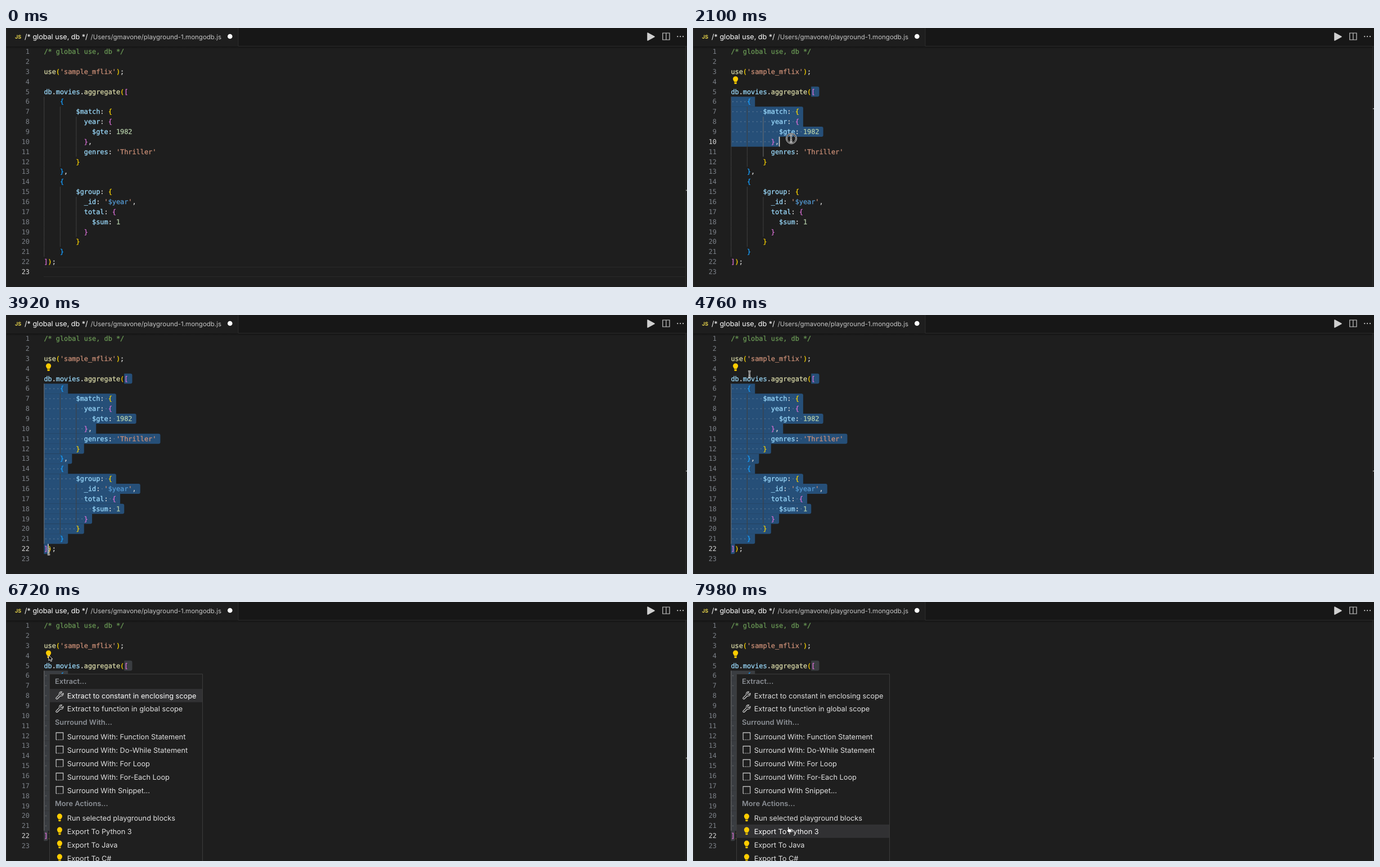
Recreate the animation shown at these times as an HTML page. Size 1211 px wide and 462 px high, loop 8000 ms.

```html
<!DOCTYPE html>
<html lang="en">
<head>
<meta charset="utf-8">
<title>Playground editor</title>
<style>
  html, body { margin: 0; width: 100%; height: 100%; overflow: hidden; background: #1e1e1e; }
  svg { display: block; width: 100%; height: 100%; }
  text { white-space: pre; text-rendering: geometricPrecision; }
  .code { font: 11.86px "DejaVu Sans Mono", monospace; }
  .code tspan { fill: currentColor; stroke: currentColor; stroke-width: .25; }
  .ui { font: 12.6px Inter, sans-serif; }
  .item { font-size: 12.74px; }
  .head { font-weight: 600; font-size: 12.8px; fill: #8b8f95; }
</style>
</head>
<body>
<svg id="stage" viewBox="0 0 1211 462">
  <defs>
    <linearGradient id="shade" x2="0" y2="1">
      <stop stop-color="#141414"/><stop offset="1" stop-color="#141414" stop-opacity="0"/>
    </linearGradient>
    <g id="bulb">
      <path d="M-2.2 3.2C-2.4 1.6-4.6.6-4.6-2.2a4.6 4.6 0 0 1 9.2 0C4.6.6 2.4 1.6 2.2 3.2Z" fill="#fc0"/>
      <path d="M-2.1 4h4.2v1.9q0 .9-1 .9h-2.2q-1 0-1-.9Z" fill="#fc0"/>
    </g>
    <path id="wrench" d="M-6.3 4.4L-.7-1.2C-1.5-4.4 1-7 4.2-6.2L1.8-3.6 2.2-1.7 4.1-1.4 6.5-3.8C7.2-.7 4.6 2 1.4 1.1L-4.2 6.6Q-5.4 7-6.3 6.2-7 5.3-6.3 4.4Z" fill="none" stroke="#d8d8d8" stroke-width="1.1" stroke-linejoin="round"/>
    <g id="snippet" fill="none" stroke="#d8d8d8" stroke-width="1.1">
      <path d="M-6.3 6.3V-6.3H6.3V6.3"/><path d="M-6.3 6.3H6.3" stroke-dasharray="1.8 1.3"/>
    </g>
    <path id="arrow" d="M0 0V9.6L2.2 7.6 3.8 11 5.5 10.2 4 7H6.9Z" fill="#000" stroke="#fff" stroke-width=".9" stroke-linejoin="round"/>
    <g id="ibeam" fill="none">
      <path d="M-2.3-5.4Q0-5.4 0-4V4Q0 5.4-2.3 5.4M2.3-5.4Q0-5.4 0-4M0 4Q0 5.4 2.3 5.4M-1.4 2H1.4" stroke="#fff" stroke-width="2.4"/>
      <path d="M-2.3-5.4Q0-5.4 0-4V4Q0 5.4-2.3 5.4M2.3-5.4Q0-5.4 0-4M0 4Q0 5.4 2.3 5.4" stroke="#222" stroke-width=".9"/>
    </g>
    <path id="hand" d="M-1 .4Q0-.9 1 .4V3.2L5 4Q6 4.4 5.8 5.8L5 9.6H.2L-2.8 5.8Q-2.9 4.6-1 5.6Z" fill="#fff" stroke="#222" stroke-width=".8" stroke-linejoin="round"/>
    <g id="ring" fill="none">
      <circle r="11" stroke="#111" stroke-width="3.4"/>
      <circle r="12.2" stroke="#fff" stroke-width="1.2"/>
      <circle r="9.8" stroke="#ddd" stroke-width="1.2"/>
    </g>
  </defs>

  <path d="M0 0H1211V462H0Z" fill="#1e1e1e"/>
  <g id="under"></g>
  <g id="code" class="code"></g>
  <g id="over"></g>

  <path d="M413 0H1211V32H413Z" fill="#171717"/>
  <path d="M.9 0V462M413 0V32.5H1211" fill="none" stroke="#2c2c2c"/>
  <path d="M1 33H1208V37H1Z" fill="url(#shade)"/>
  <path d="M1208.5 33V462" stroke="#292929"/>
  <text x="16" y="18.6" fill="#e3d04a" style="font:700 9px Inter,sans-serif">JS</text>
  <text class="ui" x="33" y="19.6" fill="#fff">/* global use, db */</text>
  <text class="ui" x="150.5" y="19.6" fill="#c4c4c4" style="font-size:11.5px">/Users/gmavone/playground-1.mongodb.js</text>
  <circle cx="398.3" cy="15" r="4.3" fill="#fff"/>
  <path d="M1141 9V22L1153 15.5Z" fill="#d0d0d0" stroke="#d0d0d0" stroke-width="1.6" stroke-linejoin="round"/>
  <path d="M1167.8 9H1180V21H1167.8ZM1173.9 9V21" fill="none" stroke="#c8c8c8" stroke-width="1.2"/>
  <g fill="#c8c8c8"><circle cx="1194.3" cy="15.2" r="1.1"/><circle cx="1199.2" cy="15.2" r="1.1"/><circle cx="1204.1" cy="15.2" r="1.1"/></g>
  <g id="menu"></g>
  <g id="mouse"></g>
</svg>
<script>
const LOOP = 8000, STEP = 70;
const LEFT = 67.4, TOP = 33.1, CHAR = 7.14, LINE = 17.86;
const $ = id => document.getElementById(id);
const colX = c => LEFT + c * CHAR;
const lineY = n => TOP + (n - 1) * LINE;

const source = `/* global use, db */

use('sample_mflix');

db.movies.aggregate([
    {
        $match: {
          year: {
            $gte: 1982
          },
          genres: 'Thriller'
        }
    },
    {
        $group: {
          _id: '$year',
          total: {
            $sum: 1
          }
        }
    }
]);
`.split('\n');
const indentOf = s => s.search(/\S|$/);

// Foldable blocks, outer to inner: first line, last line, guide column.
const blocks = [[5, 22, 0], [6, 13, 4], [14, 21, 4], [7, 12, 8], [15, 20, 8]];
const anchor = { line: 5, col: 20 };

const CLICK = 1120, BULB = 1470, DRAG = 1820, RELEASE = 3920, PRESS = 5600, OPEN = 5740;
const presses = [[CLICK, 1330], [DRAG, RELEASE], [PRESS, OPEN]];
const caretOff = [[0, CLICK], [1610, DRAG], [3360, 3710], [4410, 4900], [OPEN, LOOP]];
const inside = (spans, t) => spans.find(([a, b]) => t >= a && t < b);

// Pointer stops: time, x, y.
const route = [
  [0, 560, 490], [70, 545, 452], [840, 213, 113], [980, 212, 113], [DRAG, 212, 113],
  [2590, 87, 393], [2730, 78, 418], [2870, 77.5, 423], [3360, 77.5, 423], [3710, 76, 422],
  [4060, 76, 422], [4830, 101, 98], [5320, 76, 95], [6720, 76, 95],
  [7350, 158, 409], [7490, 158, 409], [7980, 169.5, 401.5]
];

function pointerAt(t) {
  const i = route.findIndex(p => p[0] > t);
  if (i < 0) return route[route.length - 1].slice(1);
  const [t0, x0, y0] = route[i - 1], [t1, x1, y1] = route[i];
  const u = (t - t0) / (t1 - t0), e = u * u * (3 - 2 * u);
  return [x0 + (x1 - x0) * e, y0 + (y1 - y0) * e];
}

function caretAt(t) {
  if (t < CLICK) return { line: 23, col: 0 };
  if (t < DRAG) return anchor;
  const [x, y] = pointerAt(Math.min(t, RELEASE));
  const line = Math.floor((y - TOP) / LINE) + 1;
  const col = Math.round((x - LEFT) / CHAR);
  return { line, col: Math.max(0, Math.min(col, source[line - 1].length)) };
}

function codeMarkup() {
  const bracketColors = ['#ffd700', '#da70d6', '#179fff'];
  const tokens = /\/\*.*\*\/|'(?!\$)[^']*'|[$\w]+|\S/g;
  let depth = 0;
  const color = s => {
    if ('([{'.includes(s)) return bracketColors[depth++ % 3];
    if (')]}'.includes(s)) return bracketColors[--depth % 3];
    if (s.startsWith('/*')) return '#6a9955';
    if (s[0] === "'") return '#ce9178';
    if (s === '$year') return '#569cd6';
    if (/^\d/.test(s)) return '#b5cea8';
    if (s === 'use' || s === 'aggregate') return '#dcdcaa';
    return /[$\w]/.test(s) ? '#9cdcfe' : '#d4d4d4';
  };
  return source.map((s, i) => {
    const y = lineY(i + 1) + 13;
    const spans = [...s.matchAll(tokens)].map(m =>
      `<tspan x="${colX(m.index)}" color="${color(m[0])}">${m[0]}</tspan>`).join('');
    return `<text class="number" x="42" y="${y}" text-anchor="end">${i + 1}</text><text y="${y}">${spans}</text>`;
  }).join('');
}

function selectionMarkup(caret, focused) {
  const rows = [];
  for (let n = anchor.line; n <= caret.line; n++) {
    const from = n === anchor.line ? anchor.col : 0;
    const to = n === caret.line ? caret.col : source[n - 1].length + 1;
    rows.push({ n, from, to });
  }
  let out = '', dots = '';
  rows.forEach(({ n, from, to }, i) => {
    if (to <= from) return;
    const reach = r => r ? r.to : 0;
    const a = reach(rows[i - 1]) < to ? 3 : 0, b = reach(rows[i + 1]) < to ? 3 : 0;
    const x = colX(from), r = colX(to), y = lineY(n), end = y + LINE + .15;
    out += `<path d="M${x} ${y}H${r - a}q${a} 0 ${a} ${a}V${end - b}q0 ${b} ${-b} ${b}H${x}Z" fill="${focused ? '#264f78' : '#3a3d41'}"/>`;
    for (let c = from; c < to; c++) {
      if (source[n - 1][c] === ' ') dots += `<circle cx="${colX(c + .5)}" cy="${y + 9}" r=".85"/>`;
    }
  });
  return out + `<g fill="#e3e4e2" opacity=".3">${dots}</g>`;
}

function guideMarkup(line) {
  const active = blocks.filter(([a, b]) => line >= a && line <= b).pop();
  let dim = '', lit = '';
  source.forEach((s, i) => {
    for (let c = 0; c < indentOf(s); c += 4) {
      const n = i + 1, seg = `M${colX(c) + .4} ${lineY(n)}v${LINE}`;
      if (active && c === active[2] && n > active[0] && n < active[1]) lit += seg;
      else dim += seg;
    }
  });
  return `<path d="${dim}" stroke="#404040"/><path d="${lit}" stroke="#707070"/>`;
}

const menuRows = [
  [142, 'Extract...'],
  [167, 'Extract to constant in enclosing scope', 'wrench'],
  [190.5, 'Extract to function in global scope', 'wrench'],
  [215, 'Surround With...'],
  [240, 'Surround With: Function Statement', 'snippet'],
  [264, 'Surround With: Do-While Statement', 'snippet'],
  [288, 'Surround With: For Loop', 'snippet'],
  [312, 'Surround With: For-Each Loop', 'snippet'],
  [336, 'Surround With Snippet...', 'snippet'],
  [360, 'More Actions...'],
  [385, 'Run selected playground blocks', 'bulb'],
  [409, 'Export To Python 3', 'bulb'],
  [433, 'Export To Java', 'bulb'],
  [457, 'Export To C#', 'bulb']
];
const rowAt = ([x, y]) => x < 78 ? undefined : menuRows.find(r => r[2] && Math.abs(y - r[0]) <= 12);

function focusedRow(t) {
  let row = menuRows[1];
  for (let s = 6720; s <= t; s += STEP) row = rowAt(pointerAt(s)) || row;
  return row;
}

function menuMarkup(t) {
  const focus = focusedRow(t);
  return '<path d="M77.5 475V128.5H349.5V475Z" fill="#1f1f1f" stroke="#3c3c3c"/>' + menuRows.map(row => {
    const [y, label, icon] = row;
    if (!icon) return `<text class="ui head" x="87" y="${y + 4.2}">${label}</text>`;
    const on = row === focus;
    return (on ? `<path d="M78 ${y - 12}H349V${y + 11.7}H78Z" fill="#313133"/>` : '') +
      `<use href="#${icon}" x="95.4" y="${y - .6}"/>` +
      `<text class="ui item" x="108.7" y="${y + 4.5}" fill="${on ? '#fff' : '#e0e0e0'}">${label}</text>`;
  }).join('');
}

function mouseMarkup(t) {
  const at = pointerAt(t), [x, y] = at;
  const overBulb = t > 4060 && x < 84 && Math.abs(y - 94) < 9;
  let shape = overBulb ? 'arrow' : 'ibeam';
  if (t >= OPEN) shape = rowAt(at) ? 'hand' : 'arrow';
  const press = inside(presses, t);
  const scale = press && t - press[0] < 150 ? 1 : .77;
  return (press ? `<use href="#ring" transform="translate(${x + .5} ${y}) scale(${scale})"/>` : '') +
    `<use href="#${shape}" x="${x}" y="${y}"/>`;
}

function underMarkup(t, caret) {
  let out = '';
  if (t < DRAG) {
    const y = lineY(caret.line);
    out += `<path d="M67 ${y + .4}H1208M67 ${y + LINE - .4}H1208" stroke="#2a2a2a"/>`;
  } else {
    out += selectionMarkup(caret, t < OPEN);
  }
  out += guideMarkup(caret.line);
  if (t >= CLICK && t < DRAG) {
    for (const [n, c] of [[5, 20], [22, 0]])
      out += `<rect x="${colX(c) + .3}" y="${lineY(n) + .6}" width="${CHAR - .4}" height="${LINE - 1.2}" fill="#1c2a1c" stroke="#888"/>`;
  }
  return out;
}

function overMarkup(t, caret) {
  let out = `<path d="M1208 ${32 + 11.2 * caret.line}h3" stroke="#a0a0a0" stroke-width="1.6"/>`;
  if (!inside(caretOff, t))
    out += `<path d="M${colX(caret.col) + .5} ${lineY(caret.line)}v${LINE}" stroke="#d8d8d8" stroke-width="1.6"/>`;
  if (t >= BULB) out += '<use href="#bulb" x="75.6" y="93"/>';
  return out;
}

$('code').innerHTML = codeMarkup();
const numbers = [...document.querySelectorAll('.number')];
let shown = -1;

function draw(now) {
  const t = Math.floor((now % LOOP) / STEP) * STEP;
  if (t === shown) return;
  shown = t;
  const caret = caretAt(t);
  $('under').innerHTML = underMarkup(t, caret);
  $('over').innerHTML = overMarkup(t, caret);
  numbers.forEach((el, i) => el.setAttribute('fill', i + 1 === caret.line ? '#d8d8d8' : '#7c8188'));
  $('menu').innerHTML = t >= OPEN ? menuMarkup(t) : '';
  $('mouse').innerHTML = mouseMarkup(t);
}

const start = performance.now();
function tick() {
  draw(performance.now() - start);
  requestAnimationFrame(tick);
}
tick();
</script>
</body>
</html>
```
